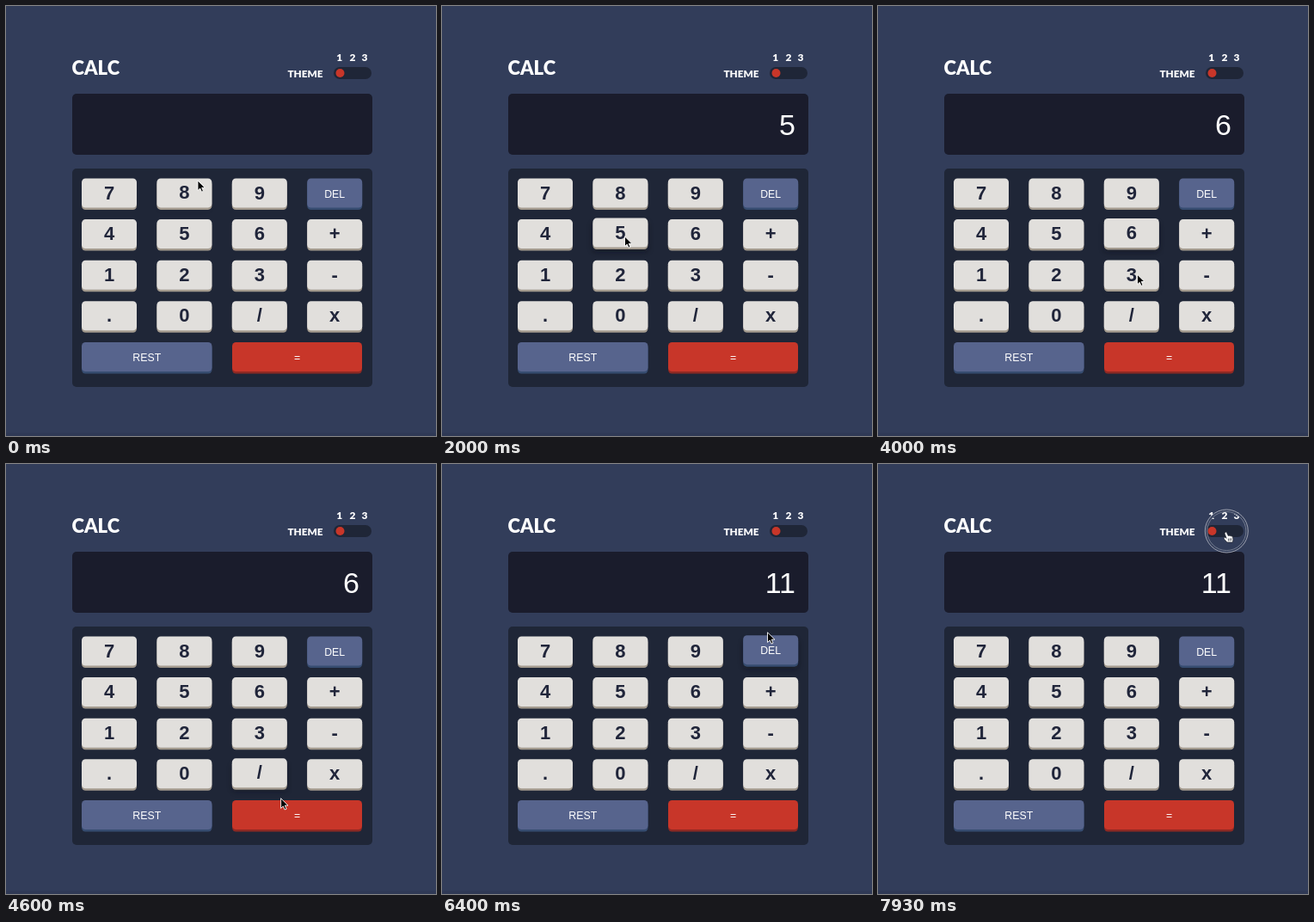
These frames come from a looping animation (500x500 px, 8 s). An HTML page:

```html
<!DOCTYPE html>
<html lang="en">
<head>
<meta charset="utf-8">
<title>Calculator</title>
<style>
  html, body { margin: 0; width: 100%; height: 100%; overflow: hidden; background: #323d5a; }
  svg { display: block; width: 100vw; height: 100vh; }
  text { fill: #fff; text-anchor: middle; }
  .head { font-family: Lato, sans-serif; font-weight: 900; }
  .key { font: 700 22px "Liberation Sans", Arial, sans-serif; fill: #20253a; }
  .word { font: 12.3px "Liberation Sans", Arial, sans-serif; }
  #out { font: 34px "Liberation Sans", Arial, sans-serif; text-anchor: end; }
</style>
</head>
<body>
<svg viewBox="0 0 500 500">
  <defs>
    <filter id="soft" x="-30%" y="-50%" width="160%" height="200%"><feGaussianBlur stdDeviation="3"/></filter>
  </defs>
  <rect width="500" height="500" fill="#323d5a"/>
  <rect y="496.5" width="500" height="3.5" fill="#2f3955"/>
  <g class="head">
    <text x="76.5" y="80" font-size="22" style="text-anchor:start">CALC</text>
    <text x="348" y="82.5" font-size="11.8">THEME</text>
    <g font-size="12">
      <text x="387.8" y="64">1</text>
      <text x="403" y="64">2</text>
      <text x="417" y="64">3</text>
    </g>
  </g>
  <rect x="381" y="71" width="44" height="14" rx="7" fill="#1f2637"/>
  <circle cx="388.5" cy="78" r="5" fill="#c83629"/>
  <rect x="77" y="102" width="349" height="71" rx="5" fill="#1a1c2c"/>
  <text id="out" x="411" y="149.5"></text>
  <rect x="77" y="189" width="349" height="254" rx="5" fill="#1f2637"/>
  <g id="keys"></g>
  <g id="ring" fill="none">
    <circle stroke="#323d5a" stroke-width="3"/>
    <circle stroke="#b9bcc6" stroke-width=".8"/>
    <circle stroke="#8f95a5" stroke-width=".7"/>
  </g>
  <path id="arrow" d="M0 0V11.6L2.7 9.1L4.5 13.2L6.5 12.3L4.7 8.3H8.4Z" fill="#000" stroke="#fff" stroke-width=".9" stroke-linejoin="round"/>
  <g id="hand" stroke="#20242f" stroke-width=".7" stroke-linejoin="round" stroke-linecap="round">
    <path fill="#fff" d="M-1.6.7Q-.4-.6.5.8L2.3 4.6Q3.2 3.6 4.1 4.7Q5.1 3.9 5.9 5Q7.1 4.6 7.5 5.9Q8.6 9 7.3 12H.9L-2.5 8.2Q-3.6 6.5-2 6.1L.2 7.3L-1.9 2Q-2.1 1.2-1.6.7Z"/>
    <path fill="none" d="M2.4 8V10.2M4.1 7.8V10.1M5.8 7.6V9.9"/>
  </g>
</svg>
<script>
const NS = 'http://www.w3.org/2000/svg';
const LOOP = 8000, FADE = 250, LIFT = 1.5;
const $ = id => document.getElementById(id);

// cursor path: time, x, y
const path = [
  [0, 223, 203], [350, 222, 208], [800, 214, 238], [1030, 211, 274], [1130, 215, 300],
  [1400, 216, 308], [1800, 212, 268], [2200, 214, 268], [2560, 366, 258], [2870, 377, 256],
  [3150, 377, 257], [3450, 306, 262], [3930, 300, 272], [4000, 301.5, 312], [4350, 312, 360],
  [4900, 325, 408], [5800, 325, 408], [6100, 376, 222], [6320, 378, 208], [6400, 378.5, 196],
  [6700, 390, 130], [7250, 403, 82], [7930, 405, 79], [8000, 405, 79]
];

const slope = (i, a) => (path[i + 1][a] - path[i][a]) / (path[i + 1][0] - path[i][0]);

// smooth tangent that never overshoots
function tangent(i, a) {
  if (i === 0 || i === path.length - 1) return 0;
  const p = slope(i - 1, a), q = slope(i, a);
  return p * q > 0 ? 2 * p * q / (p + q) : 0;
}

function cursor(t) {
  let i = 0;
  while (i < path.length - 2 && t >= path[i + 1][0]) i++;
  const d = path[i + 1][0] - path[i][0], u = (t - path[i][0]) / d;
  const s = u * u * (3 - 2 * u);
  return [1, 2].map(a =>
    path[i][a] * (1 - s) + path[i + 1][a] * s +
    d * u * (1 - u) * ((1 - u) * tangent(i, a) - u * tangent(i + 1, a)));
}

function add(parent, tag, attrs, text) {
  const el = document.createElementNS(NS, tag);
  for (const k in attrs) el.setAttribute(k, attrs[k]);
  if (text) el.textContent = text;
  return parent.appendChild(el);
}

const light = ['#e1dfdc', '#a39a8e'], blue = ['#57648d', '#364c70'], red = ['#c83629', '#8e2923'];
const keys = [];

function addKey(label, x, y, w, [face, edge], cls) {
  const g = add($('keys'), 'g', {});
  const box = { x, y, width: w, height: 34, rx: 4.5 };
  const glow = add(g, 'rect', { ...box, y: y + 5, fill: '#0b0e18', filter: 'url(#soft)', opacity: 0 });
  add(g, 'rect', { ...box, y: y + 2.5, fill: edge });
  add(g, 'rect', { ...box, fill: face });
  add(g, 'text', { x: x + w / 2, y: y + (cls === 'key' ? 24 : 22), class: cls }, label);
  keys.push({ g, glow, x, y, w });
}

['7 8 9 DEL', '4 5 6 +', '1 2 3 -', '. 0 / x'].forEach((row, r) =>
  row.split(' ').forEach((label, c) => {
    const del = label === 'DEL';
    addKey(label, 88 + c * 87.4, 200.5 + r * 47.6, 64, del ? blue : light, del ? 'word' : 'key');
  }));
addKey('REST', 88, 391, 151.5, blue, 'word');
addKey('=', 263, 391, 151, red, 'word');

const over = (k, [x, y]) => x >= k.x && x <= k.x + k.w && y >= k.y && y <= k.y + 36;

function draw(t) {
  const pos = cursor(t);

  // hover transition: share of the last moments spent over the key
  const trail = [];
  for (let s = 0; s < 25; s++) {
    const past = t - s * FADE / 25;
    if (past > 0) trail.push(cursor(past));
  }
  for (const k of keys) {
    const h = trail.filter(p => over(k, p)).length / 25;
    k.g.setAttribute('transform', `translate(0 ${-LIFT * h})`);
    k.glow.setAttribute('opacity', h * 0.5);
  }

  $('out').textContent = t < 1950 ? '' : t < 3620 ? '5' : t < 5300 ? '6' : '11';

  const onToggle = pos[0] > 381 && pos[1] > 71 && pos[1] < 85;
  $('arrow').style.display = onToggle ? 'none' : '';
  $('hand').style.display = onToggle ? '' : 'none';
  $(onToggle ? 'hand' : 'arrow').setAttribute('transform', `translate(${pos})`);

  const grow = Math.min(1, Math.max(0, (t - 7730) / 200));
  const r = 25 * (1 - (1 - grow) ** 2);
  $('ring').style.display = grow > 0 ? '' : 'none';
  $('ring').setAttribute('transform', 'translate(405.3 78)');
  [-1.3, 0, -2.4].forEach((d, i) => $('ring').children[i].setAttribute('r', Math.max(0, r + d)));
}

const start = performance.now();
function tick() {
  draw((performance.now() - start) % LOOP);
  requestAnimationFrame(tick);
}
tick();
</script>
</body>
</html>
```
